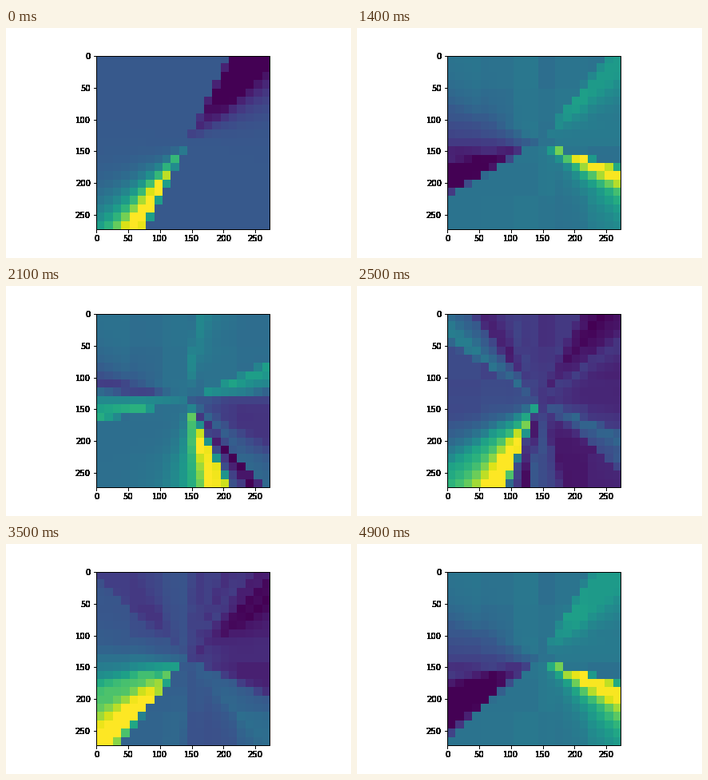
Recreate the animation shown at these times as a matplotlib script. Size 432x288 px, loop 5 s.

```python
import numpy as np
import matplotlib.pyplot as plt
from matplotlib.animation import FuncAnimation

CELLS, CELL, FRAMES = 21, 13, 50
ROW, COL = np.mgrid[0:CELLS, 0:CELLS]
X, Y = COL - 10.5, ROW - 10
ANGLE = np.degrees(np.arctan2(X, Y))  # 0 points down, positive to the right
REACH = np.minimum(1, .3 + .14 * np.maximum(abs(X), abs(Y)))


def beam(edge, width, strength):
    """Ray from the middle: sharp leading edge, flat core, fading trail."""
    behind = (edge - ANGLE) % 360
    rise = np.minimum(1, behind / 4)
    trail = np.exp(-np.maximum(0, behind - width) / min(12, width))
    return strength * REACH * rise * trail


def sideways(spread):
    return .38, [(74, 10 + spread / 2, .62),
                 (143 + spread, 12 + spread, .17),
                 (-58 + 1.5 * spread, 17 + spread, -.38),
                 (-80, 30, -.1)]


# Frame: (background, beams as edge, width, strength); the main beam is first.
POSES = {
    0: (.28, [(-25, 11, .72), (156, 23, -.29)]),
    7: (.18, [(27, 15, .82), (-152, 6, -.17), (125, 30, -.17),
              (-75, 27, -.1), (178, 8, .22), (65, 35, .12)]),
    14: sideways(0),
    21: (.36, [(28, 14, .66), (43, 6, -.36), (98, 35, -.2),
               (117, 8, .2), (178, 8, .12), (-94, 9, -.2), (-75, 8, .27)]),
    30: (.4, [(-77, 34, .46), (-79, 12, .12), (-40, 40, .12),
              (97, 65, -.23), (90, 6, -.1), (138, 40, -.09)]),
    41: (.21, [(10, 14, .79), (-15, 25, .13), (-168, 8, -.2),
               (-153, 6, -.12), (-82, 16, -.16), (114, 24, .22)]),
    49: sideways(7),
}
TIMES = list(POSES)
HEADINGS = [beams[0][0] for _, beams in POSES.values()]

# Faint patchwork: cells between the same splits share one small offset.
SPLITS = [4, 8, 11, 13, 17]
OFFSETS = np.random.default_rng(4).uniform(-.02, .02, (6, 6))
PATCHWORK = OFFSETS[np.digitize(ROW, SPLITS), np.digitize(COL, SPLITS)]


def posed(time, heading):
    level, beams = POSES[time]
    turn = heading - beams[0][0]
    return level + sum(beam(edge + turn, width, strength)
                       for edge, width, strength in beams)


def field(frame):
    heading = np.interp(frame, TIMES, HEADINGS)
    k = min(np.searchsorted(TIMES, frame, side="right"), len(TIMES) - 1)
    start, end = TIMES[k - 1], TIMES[k]
    t = (frame - start) / (end - start)
    g = (1 - t) * posed(start, heading) + t * posed(end, heading)
    g = np.clip(g + PATCHWORK * min(1, frame / 7), 0, 1)
    g = (g - g.min()) / (g.max() - g.min())
    return np.kron(g, np.ones((CELL, CELL)))


plt.rcParams.update({"font.family": "DejaVu Sans", "font.size": 10,
                     "text.kerning_factor": 0})
fig = plt.figure(figsize=(6, 4), dpi=72, facecolor="white")
box = [.125, .125, .775, .755]
ticks = range(0, 251, 50)
ax = fig.add_axes(box)
image = ax.imshow(field(0), cmap="viridis", vmin=0, vmax=1,
                  interpolation="nearest")

# Repeated drawing gives the heavy, hard-edged axis and labels.
for _ in range(4):
    layer = fig.add_axes(box, facecolor="none", aspect="equal")
    layer.set(xlim=ax.get_xlim(), ylim=ax.get_ylim())
for axes in fig.axes:
    axes.set(xticks=ticks, yticks=ticks)

below, x_va, x_ha = ax.get_xaxis_text1_transform(7)
beside, y_va, y_ha = ax.get_yaxis_text1_transform(7)
for _ in range(15):
    for tick in ticks:
        ax.text(tick, 0, str(tick), transform=below, va=x_va, ha=x_ha)
        ax.text(0, tick, str(tick), transform=beside, va=y_va, ha=y_ha)


def update(frame):
    image.set_data(field(frame))
    return [image]


anim = FuncAnimation(fig, update, frames=FRAMES, interval=100,
                     repeat=True, repeat_delay=0, blit=False)
plt.show()
```
